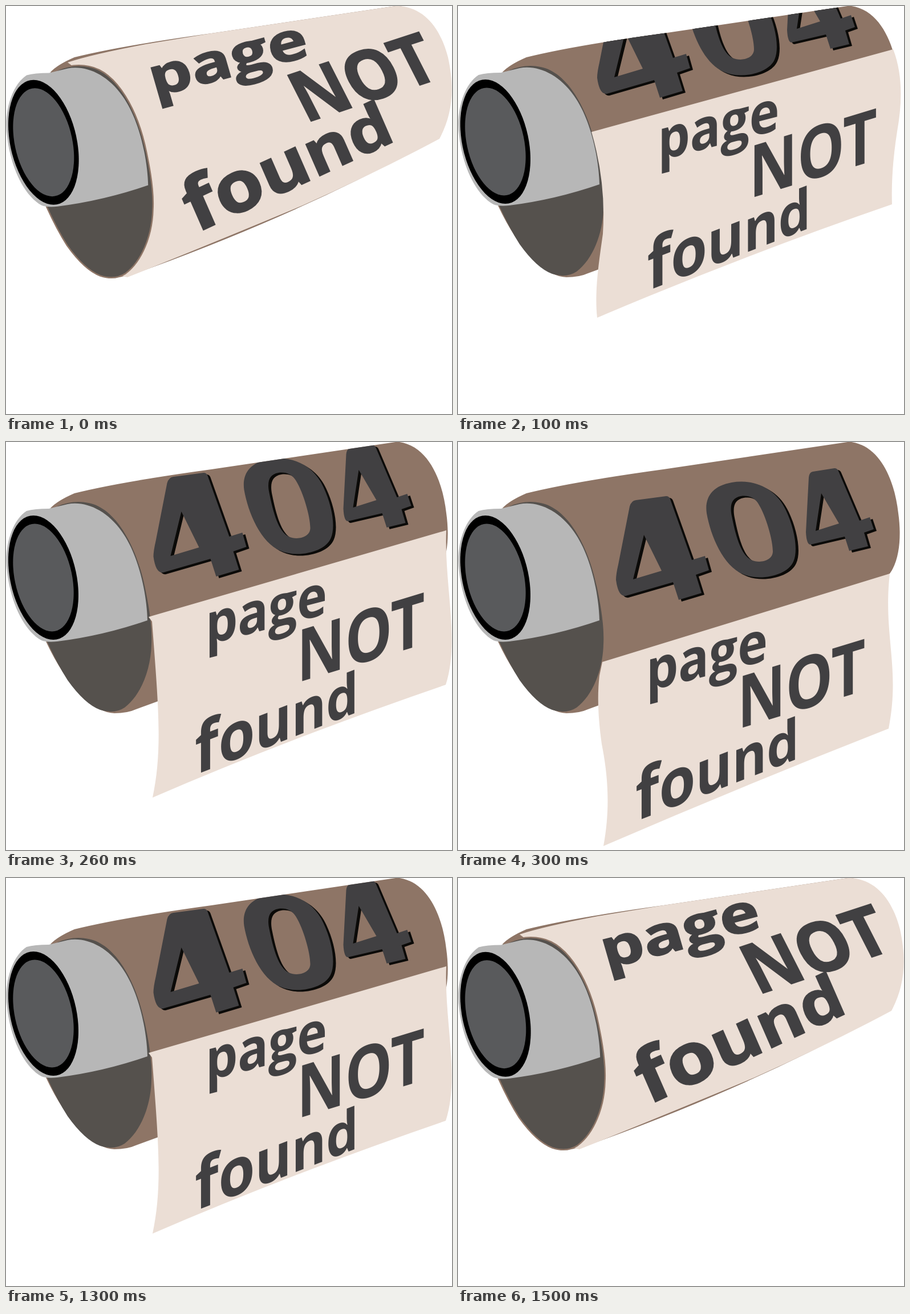
Recreate the animation shown at these times as an HTML page. Size 782x716 px, loop 1.6 s.

```html
<!DOCTYPE html>
<html lang="en">
<head>
<meta charset="utf-8">
<title>404 page NOT found</title>
<style>
  html, body { margin: 0; height: 100%; overflow: hidden; background: #fff; }
  svg { display: block; width: 100vw; height: 100vh; }
  text { font: 700 100px "Open Sans", "Noto Sans", sans-serif; }
  .ink { fill: #414042; }
  .bold { stroke: #414042; stroke-width: 2; }
  .brown { fill: #8e7566; }
  .paper { fill: #ebded5; }
  .rolled #mouth { stroke: #8e7566; stroke-width: 5; paint-order: stroke; }
  .rolled .open, .unrolled .closed { display: none; }
</style>
</head>
<body>
<svg viewBox="0 0 782 716" role="img" aria-label="404 page NOT found">
  <defs>
    <path id="body" d="M70 350Q98 410 133 446Q163 475 190 476Q213 476 228 469Q525 362 757 231C776 205 777 160 772 125C766 70 742 8 690 0H683L360 48Q200 70 120 90Q90 103 78 116Z"/>
    <clipPath id="onBody"><use href="#body"/></clipPath>
    <g id="digits" fill-rule="evenodd">
      <path d="M312 102L365 95Q370 95 372 100L410 207L433 200L440 225L417 233L427 265L387 277L377 246L294 270Q281 272 277 242Q277 232 281 215L301 113Q304 103 312 102ZM326 163L307 241L357 226Z"/>
      <path d="M480 71C520 64 558 82 575 120C590 152 597 190 588 210C578 234 530 245 500 232C465 218 443 165 436 125C432 97 446 77 480 71ZM496 95C480 98 476 110 480 130C487 165 496 198 514 207C530 214 552 208 552 192C552 172 540 130 527 109C520 97 508 93 496 95Z"/>
      <path d="M622 52L660 46Q665 46 667 51L704 138L722 132L729 153L712 159L719 183L686 191L678 166L618 180Q611 180 610 158L615 62Q616 53 622 52ZM637 90L627 156L668 143Z"/>
    </g>
    <!-- Letters shrink towards the far end -->
    <text id="found"><tspan font-size="114" style="font-size:114px">f</tspan><tspan style="font-size:110px">o</tspan><tspan style="font-size:104px">u</tspan><tspan style="font-size:98px">n</tspan><tspan style="font-size:95px">d</tspan></text>
  </defs>
  <g id="scene">
    <use href="#body" class="brown"/>
    <path class="paper closed" d="M108 99Q150 85 245 67L360 48L683 0H690C735 4 762 40 775 90C787 145 783 190 760 233Q650 292 520 350Q372 412 213 476L180 470L150 130Z"/>
    <g class="open" clip-path="url(#onBody)">
      <g id="number">
        <use href="#digits" x="5" y="3" fill="#0b0a08"/>
        <use href="#digits" class="ink"/>
      </g>
    </g>
    <g id="tube">
      <path id="mouth" fill="#55514d" d="M90 113Q118 101 145 107C192 116 230 182 245 262Q257 320 255 355C254 400 236 445 208 466Q190 478 165 470Q138 460 108 418Q90 390 72 350Z"/>
      <path fill="#b7b7b7" d="M36 121C10 138-4 185 2 228C8 280 30 330 62 348Q72 352 90 350Q170 340 248 313C247 270 234 200 203 157C177 120 140 103 108 109L75 117Q50 117 36 121Z"/>
      <g transform="matrix(1 0 .16 1 65.5 238)">
        <ellipse rx="59" ry="109"/>
        <ellipse rx="51" ry="94.5" fill="#595a5c"/>
      </g>
    </g>
    <path id="sheet" class="paper open"/>
    <g id="words" class="ink open">
      <text transform="matrix(.89 -.231 0 1 330 438)">page</text>
      <text transform="matrix(1.04 -.317 0 1.27 490 504)">NOT</text>
      <use href="#found" transform="matrix(.94 -.364 0 1.06 311 666)"/>
    </g>
    <g class="ink bold closed">
      <text transform="matrix(1.15 -.305 .26 .9 260 160)">page</text>
      <text transform="matrix(1.12 -.37 .57 1.12 525 205)">NOT</text>
      <use href="#found" transform="matrix(1.155 -.537 .45 1.03 333 399)"/>
    </g>
  </g>
</svg>
<script>
const el = id => document.getElementById(id);
const set = (id, name, value) => el(id).setAttribute(name, value);
const move = (id, x, y) => set(id, "transform", `translate(${x} ${y})`);

// How far the paper hangs: hanging sheet, offset of the digits, offset of the words
const poses = [
  null,
  { sheet: "M234 221L763 76C780 120 779 170 770 220Q759 290 761 348Q500 438 244 547C239 500 247 450 254 400Q260 310 234 221Z",
    number: [-33, -116], words: [20.5, -166] },
  { sheet: "M250 307L772 155C768 250 796 350 771 426Q500 519 257 624C275 540 267 460 256 315Z",
    number: [-18.5, -41], words: [20, -81.5] },
  { sheet: "M253 386L757 231C745 340 776 395 755 503Q500 603 255 709C268 640 262 580 252 530Q242 460 248 410Z",
    number: [0, 0], words: [0, 0] }
];

// [end time, pose, drop of the whole roll]
const steps = [
  [100, 0, 0], [200, 1, 0], [300, 2, 0], [1300, 3, 0],
  [1400, 2, 0], [1500, 1, 3.7], [1600, 0, 0]
];

function draw() {
  const time = performance.now() % 1600;
  const [, index, drop] = steps.find(([end]) => time < end);
  const pose = poses[index];
  set("scene", "class", pose ? "unrolled" : "rolled");
  set("tube", "transform", `scale(${pose ? 1 : 1.005})`);
  move("scene", 0, drop);
  if (pose) {
    set("sheet", "d", pose.sheet);
    move("number", ...pose.number);
    move("words", ...pose.words);
  }
  requestAnimationFrame(draw);
}
draw();
</script>
</body>
</html>
```
